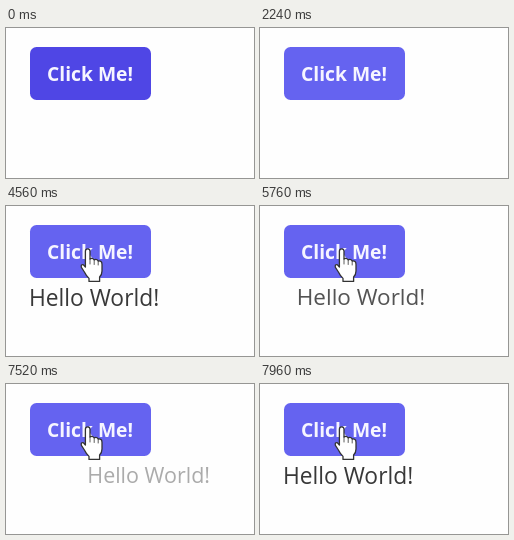
Write an HTML page that moves like this. It is 248x150 px and loops after 8 s.

```html
<!DOCTYPE html>
<html lang="en">
<head>
<meta charset="utf-8">
<title>Button and greeting</title>
<style>
  html, body { margin: 0; width: 100%; height: 100%; overflow: hidden; background: #fefefe; }
  svg { display: block; width: 248px; height: 150px; }
  text { font-family: "Open Sans", "Noto Sans", sans-serif; }
  .soft { filter: blur(0.4px); }
</style>
</head>
<body>
<svg viewBox="0 0 248 150">
  <g class="soft">
    <rect id="button" x="24" y="19" width="121" height="53" rx="6.5"/>
    <text x="41" y="53" font-size="19.3" font-weight="700" fill="#f6f5ff">Click Me!</text>
    <text id="greeting" x="22.9" y="99.5" font-size="22.8" fill="#383838">Hello World!</text>
    <g id="hand" stroke="#333" stroke-width="1.3" stroke-linejoin="round" stroke-linecap="round">
      <path fill="#fff" d="M79.4 45.2 Q79.4 42.8 81.7 42.8 Q84 42.8 84 45.2 V53 Q86.4 51.4 88.2 53.8
        Q90.8 52.6 92.2 55 Q96 54.4 96 58.4 V65 Q96 68.6 93.6 71 V75.4 H83 V72.4 Q80 69.4 78.4 66
        L75.4 61.4 Q74.6 58.4 77.2 58.6 L79.4 61 Z"/>
      <path fill="none" stroke-width="0.8" d="M84 53 V58 M88.2 54 V58.5 M92.2 55 V59"/>
    </g>
  </g>
</svg>
<script>
const LOOP = 8000, FADE = 300;
const ORIGIN = { x: 1024, y: 91 }; // middle of the wide block that holds the greeting
const [button, greeting, hand] = ["button", "greeting", "hand"].map(id => document.getElementById(id));

// Cubic Bézier easing, solved for its parameter by bisection.
function bezier(x1, y1, x2, y2) {
  const at = (a, b, s) => 3 * (1 - s) ** 2 * s * a + 3 * (1 - s) * s * s * b + s ** 3;
  return x => {
    if (x <= 0 || x >= 1) return x <= 0 ? 0 : 1;
    let low = 0, high = 1;
    for (let i = 0; i < 24; i++) {
      const mid = (low + high) / 2;
      if (at(x1, x2, mid) < x) low = mid; else high = mid;
    }
    return at(y1, y2, low);
  };
}
const easeOut = bezier(0, 0, 0.2, 1);
const easeIn = bezier(0.4, 0, 1, 1);

const enter = (t, start) => easeOut((t - start) / FADE);
const leave = (t, start) => 1 - easeIn((t - start) / FADE);

function presence(t) {
  if (t < 5670) return enter(t, 4143);
  if (t < 7000) return leave(t, 5670);
  return enter(t, 7475);
}

function draw(t) {
  const shown = presence(t), scale = 0.9 + 0.1 * shown;
  greeting.setAttribute("opacity", shown);
  greeting.setAttribute("transform",
    `translate(${ORIGIN.x} ${ORIGIN.y}) scale(${scale}) translate(${-ORIGIN.x} ${-ORIGIN.y})`);
  button.setAttribute("fill", t < 2230 ? "#4f46e5" : "#6563f0");
  hand.setAttribute("visibility", t < 4143 ? "hidden" : "visible");
}

const began = performance.now();
function tick() {
  draw((performance.now() - began) % LOOP);
  requestAnimationFrame(tick);
}
tick();
</script>
</body>
</html>
```
